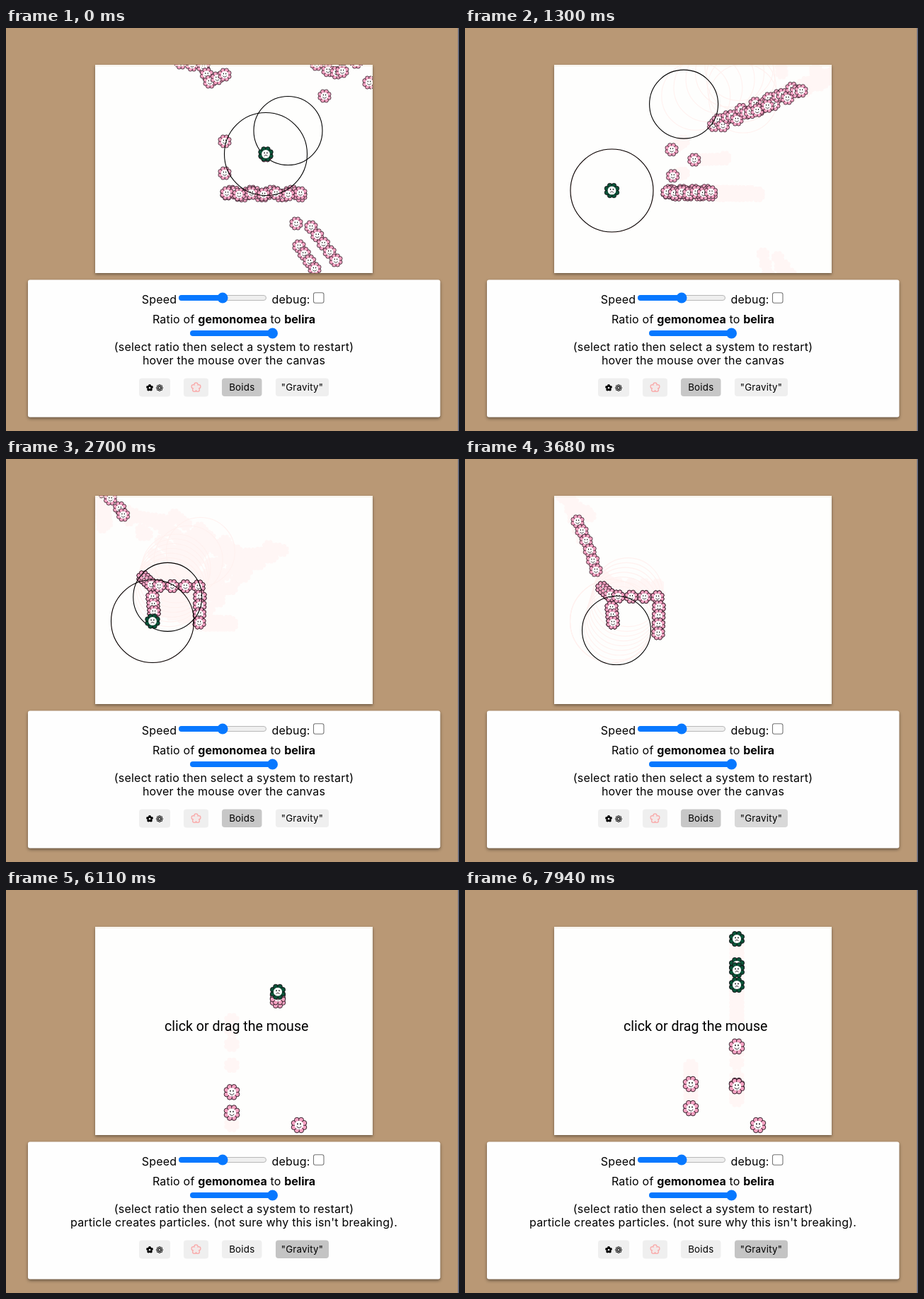
Recreate the animation shown at these times as an HTML page with a canvas. Size 640 by 569 pixels, loop 8 s.

```html
<!DOCTYPE html>
<html lang="en">
<head>
<meta charset="utf-8">
<title>Flower systems</title>
<style>
  html, body { margin: 0; width: 100%; height: 100%; overflow: hidden; background: #b99875; }
  svg, canvas { position: absolute; display: block; }
  svg { left: 0; top: 0; }
  canvas { left: 126px; top: 52px; width: 392px; height: 294px; background: #fefefd;
    box-shadow: 0 2px 4px rgba(0, 0, 0, .4); }
  text { font: 16px Inter, "Open Sans", sans-serif; letter-spacing: .22px; fill: #000; text-anchor: middle; }
  .label { font-size: 13.33px; }
  .bold { font-weight: 700; letter-spacing: 0; }
  .card { fill: #fefefe; filter: drop-shadow(0 2px 2px rgba(0, 0, 0, .45)); }
  .track { fill: #efefef; stroke: #b8b8b8; }
  .blue { fill: #0778ff; }
  .button { fill: #efefef; }
  .dots { fill: none; stroke-linecap: round; }
</style>
</head>
<body>
<svg width="640" height="569" viewBox="0 0 640 569">
  <rect x="638.6" width="1.4" height="569" fill="#5a6480"/>
  <rect class="card" x="31" y="355.5" width="582.5" height="194" rx="3"/>

  <text x="216.5" y="388.5">Speed</text>
  <rect class="track" x="244.5" y="377.5" width="123" height="7" rx="3.5"/>
  <rect class="blue" x="244" y="377" width="62" height="8" rx="4"/>
  <circle class="blue" cx="306" cy="381" r="7.5"/>
  <text x="402.5" y="388.5">debug:</text>
  <rect x="434.5" y="373.8" width="14.5" height="14.5" rx="2.5" fill="#fff" stroke="#767676" stroke-width="1.1"/>

  <text x="322" y="417">Ratio of <tspan class="bold">gemonomea</tspan> to <tspan class="bold">belira</tspan></text>
  <rect class="blue" x="260" y="427" width="120" height="8" rx="4"/>
  <circle class="blue" cx="376.5" cy="431" r="7.5"/>
  <text x="322" y="455.5">(select ratio then select a system to restart)</text>
  <text id="hint" x="322" y="475"></text>

  <rect class="button" x="188" y="494.5" width="44" height="26" rx="4"/>
  <g class="dots">
    <circle cx="203" cy="508" r="3" pathLength="5" transform="rotate(-90 203 508)" stroke="#000" stroke-width="4" stroke-dasharray="0 1"/>
    <circle cx="203" cy="508" r="1.2" fill="#efefef"/>
    <circle cx="217" cy="508" r="3.4" pathLength="8" stroke="#222" stroke-width="3.2" stroke-dasharray="0 1"/>
    <circle cx="217" cy="508" r="3.4" pathLength="8" stroke="#efefef" stroke-width="1.5" stroke-dasharray="0 1"/>
    <circle cx="217" cy="508" r="1.5" fill="#efefef" stroke="#222" stroke-width=".8"/>
  </g>
  <rect class="button" x="251" y="494.5" width="35" height="26" rx="4"/>
  <g class="dots" transform="rotate(-90 268.5 507.5)">
    <circle cx="268.5" cy="507.5" r="4" pathLength="5" stroke="#f9a8a8" stroke-width="6.4" stroke-dasharray="0 1"/>
    <circle cx="268.5" cy="507.5" r="4" pathLength="5" stroke="#f3e8e8" stroke-width="4" stroke-dasharray="0 1"/>
    <circle cx="268.5" cy="507.5" r="3.6" fill="#f3e8e8"/>
  </g>
  <rect class="button" id="boids" x="305" y="494.5" width="56.5" height="25.5" rx="4"/>
  <text class="label" x="333.3" y="512">Boids</text>
  <rect class="button" id="gravity" x="381" y="494.5" width="75" height="25.5" rx="4"/>
  <text class="label" x="418.5" y="512">"Gravity"</text>
</svg>
<canvas id="stage"></canvas>

<script>
const LOOP = 8000, SWITCH = 3960, MOUSE_OUT = 3100, FLOOR = 332;
const PINK = '#f5a3c3', GREEN = '#0b5338', GHOST = '#fff6f5';
const $ = id => document.getElementById(id);
const canvas = $('stage'), ctx = canvas.getContext('2d');
const dpr = window.devicePixelRatio || 1;
canvas.width = 392 * dpr;
canvas.height = 294 * dpr;

// A track is a list of [time, x, y, ease]; ease shapes the way to that key.
const eases = { in: u => u * u, out: u => 1 - (1 - u) ** 2 };
function at(track, t) {
  if (t < track[0][0]) return null;
  let a = track[0];
  for (const b of track) {
    if (t < b[0]) {
      const u = (t - a[0]) / (b[0] - a[0]), e = b[3] ? eases[b[3]](u) : u;
      return [a[1] + (b[1] - a[1]) * e, a[2] + (b[2] - a[2]) * e];
    }
    a = b;
  }
  return [a[1], a[2]];
}

// n places spread evenly over the legs of a polyline
function row(n, ...points) {
  const path = points.map((p, i) => [i / (points.length - 1 || 1), ...p]);
  return Array.from({ length: n }, (_, i) => at(path, n > 1 ? i / (n - 1) : 0));
}

// Boids: lines of flowers that leave, stream in from the right, then settle
const slots = [
  ...row(6, [159, 88], [174, 122], [185, 157]),
  ...row(8, [194, 182], [207, 194], [272, 195]),
  ...row(3, [207, 210], [209, 231]),
  ...row(4, [274, 209], [273, 246])
];
const rising = [
  ...row(7, [247, 49], [279, 55], [288, 76], [309, 66]),
  ...row(4, [439, 51], [463, 64], [475, 61]),
  [450, 96]
];
const sinking = [
  [410, 276],
  ...row(4, [414, 308], [436, 340]),
  ...row(5, [431, 281], [466, 328])
];
const arriving = [
  ...row(3, [138, 86], [136, 96], [142, 91]),
  [174, 86],
  ...row(5, [224, 96], [238, 79], [254, 92]),
  ...row(4, [257, 115], [270, 119], [285, 116]),
  ...row(5, [308, 139], [317, 133], [320, 155]),
  ...row(2, [261, 205], [276, 194])
];
const staying = [
  [0, ...row(2, [309, 160], [309, 205]), [367, 180], ...row(2, [495, 48], [513, 77])],
  [660, ...row(2, [308, 160], [308, 205]), [367, 185], ...row(2, [496, 69], [511, 67])],
  [1860, ...row(2, [278, 182], [281, 212]), [286, 187], ...row(2, [340, 158], [354, 148])]
];

const settle = ([x, y]) => [[2500, x, y - 18], [3680, x, y]];
const leave = (dx, dy) => ([x, y]) => [[0, x, y], [660, x + dx, y + dy]];
const flock = [
  ...rising.map(leave(-5, -65)),
  ...sinking.map(leave(22, 86)),
  ...arriving.map((p, i) => {
    const wave = 6 * Math.sin(i * 4), [x, y] = slots[i];
    return [[720 + 20 * i, 540, 58 + wave], [1320 + 20 * i, 345, 140 + wave], [1860, ...p],
      ...(i < 6 ? [[2900, x - 35, y - 80], [3680, x, y]] : settle(slots[i]))];
  }),
  ...staying[0].slice(1).map((_, i) =>
    [...staying.map(pose => [pose[0], ...pose[i + 1]]), ...settle(slots[16 + i])])
];

// The pinned bar: a jittered back row, then a tidy front row
const bar = Array.from({ length: 26 }, (_, i) => {
  const front = i > 18, u = front ? (i - 19) / 6 : i / 18;
  const y = front ? 234 - Math.cos(i * 3) : 234 + 3 * Math.sin(i * 5);
  return [[0, 312 + 104 * u, y], [660, 310 + 103 * u, y], [1860, 265 + 25 * u, y - 2.5],
    ...settle(slots[6 + i % 15])];
});

const mouse = [[0, 367, 178], [220, 208, 230], [660, 208, 230], [1860, 207, 229]];
const target = [[0, 398.5, 145], [660, 387.5, 54], [1860, 240.5, 154.5], [3680, 214, 242]];

// Gravity: pink flowers drop and bounce, green ones rise
function bouncer(x, born, from, drop, top, rise) {
  const hit = born + drop;
  return [[born, x, from], [hit, x, FLOOR, 'in'], [hit + rise, x, top, 'out'], [hit + 2 * rise, x, FLOOR, 'in']];
}
const riser = (born, from, to) => [[born, 384, from], [LOOP - 60, 384, to]];
const pinks = [
  bouncer(414, SWITCH, 192, 420, FLOOR, 1e4),
  bouncer(319, 5080, 180, 860, 248, 1285),
  bouncer(319, 5365, 180, 860, 264, 950),
  bouncer(384, 5900, 150, 1000, 276, 1000),
  bouncer(384, 6000, 150, 1000, 277, 900),
  bouncer(384, 6500, 150, 700, 219, 850)
];
const greens = [riser(6000, 147, 69), riser(7220, 200, 106), riser(6300, 208, 113), riser(6700, 231, 134)];

function disc(x, y, r, fill) {
  ctx.beginPath();
  ctx.arc(x, y, r, 0, 7);
  ctx.fillStyle = fill;
  ctx.fill();
}

function ring(p, r, color) {
  ctx.beginPath();
  ctx.arc(p[0], p[1], r, 0, 7);
  ctx.lineWidth = 1.1;
  ctx.strokeStyle = color;
  ctx.stroke();
}

function petals(fill, outlined) {
  for (let i = 0; i < 8; i++) {
    const a = (i + .5) * Math.PI / 4;
    disc(7.9 * Math.cos(a), 7.9 * Math.sin(a), 3.5, fill);
    if (outlined) ctx.stroke();
  }
}

function face(sad) {
  disc(0, 0, 6.2, '#fff');
  for (const x of [-2, 2]) {
    ctx.beginPath();
    ctx.ellipse(x, -1.7, .7, 1.2, 0, 0, 7);
    ctx.fillStyle = '#000';
    ctx.fill();
  }
  ctx.beginPath();
  if (sad) ctx.arc(0, 4.6, 3, Math.PI * 1.15, Math.PI * 1.85);
  else ctx.arc(0, .6, 3.2, Math.PI * .1, Math.PI * .9);
  ctx.stroke();
}

function flower(p, size, fill) {
  ctx.save();
  ctx.translate(p[0], p[1]);
  ctx.scale(size, size);
  ctx.strokeStyle = '#150810';
  ctx.lineWidth = .85;
  petals(fill, fill !== GHOST);
  if (fill === GHOST) disc(0, 0, 7, GHOST);
  else face(fill === GREEN);
  ctx.restore();
}

function each(tracks, t, size, fill) {
  for (const track of tracks) {
    const p = at(track, t);
    if (p) flower(p, size, fill);
  }
}

// Pictures change in steps of uneven length.
function snap(t) {
  const [start, len] = t < 880 ? [0, 110] : t < 5080 ? [880, 140] : [5080, 143];
  return start + Math.floor((t - start) / len) * len;
}

function trail(now, begin, count, draw) {
  for (let s = now; count-- > 0;) {
    s = snap(s - 1);
    if (s < begin) return;
    draw(s);
  }
}

function rings(t, color) {
  ring(at(target, t), 48.5, color);
  if (t < MOUSE_OUT) ring(at(mouse, t), 58.5, color);
}

function drawBoids(t) {
  const all = [...bar, ...flock];
  trail(t, 0, 8, s => each(all, s, .84, GHOST));
  trail(t, 0, 8, s => rings(s, '#fff1ef'));
  each(all, t, .84, PINK);
  rings(t, '#000');
  if (t < MOUSE_OUT) flower(at(mouse, t), .95, GREEN);
}

function drawGravity(t) {
  trail(t, SWITCH, 4, s => each([...pinks, ...greens], s, .98, GHOST));
  ctx.font = '19.6px Roboto, sans-serif';
  ctx.textAlign = 'center';
  ctx.fillStyle = '#000';
  ctx.fillText('click or drag the mouse', 325.7, 198.7);
  each(pinks, t, 1, PINK);
  each(greens, t, .98, GREEN);
}

function render(t) {
  const gravity = t >= SWITCH;
  $('hint').textContent = gravity
    ? "particle creates particles. (not sure why this isn't breaking)."
    : 'hover the mouse over the canvas';
  $('boids').style.fill = gravity ? '#efefef' : '#c7c7c7';
  $('gravity').style.fill = gravity ? '#c4c4c4' : t >= 3540 ? '#d8d8d8' : '#efefef';

  ctx.setTransform(dpr, 0, 0, dpr, -126 * dpr, -52 * dpr);
  ctx.clearRect(126, 52, 392, 294);
  (gravity ? drawGravity : drawBoids)(t);
  ctx.fillStyle = '#f3eee2';
  ctx.fillRect(126, 53, 392, 1);
  ctx.fillRect(516, 52, 1, 294);
}

const start = performance.now();
let shown = -1;
function tick() {
  const t = snap((performance.now() - start + 1) % LOOP);
  if (t !== shown) render(shown = t);
  requestAnimationFrame(tick);
}
tick();
</script>
</body>
</html>
```
